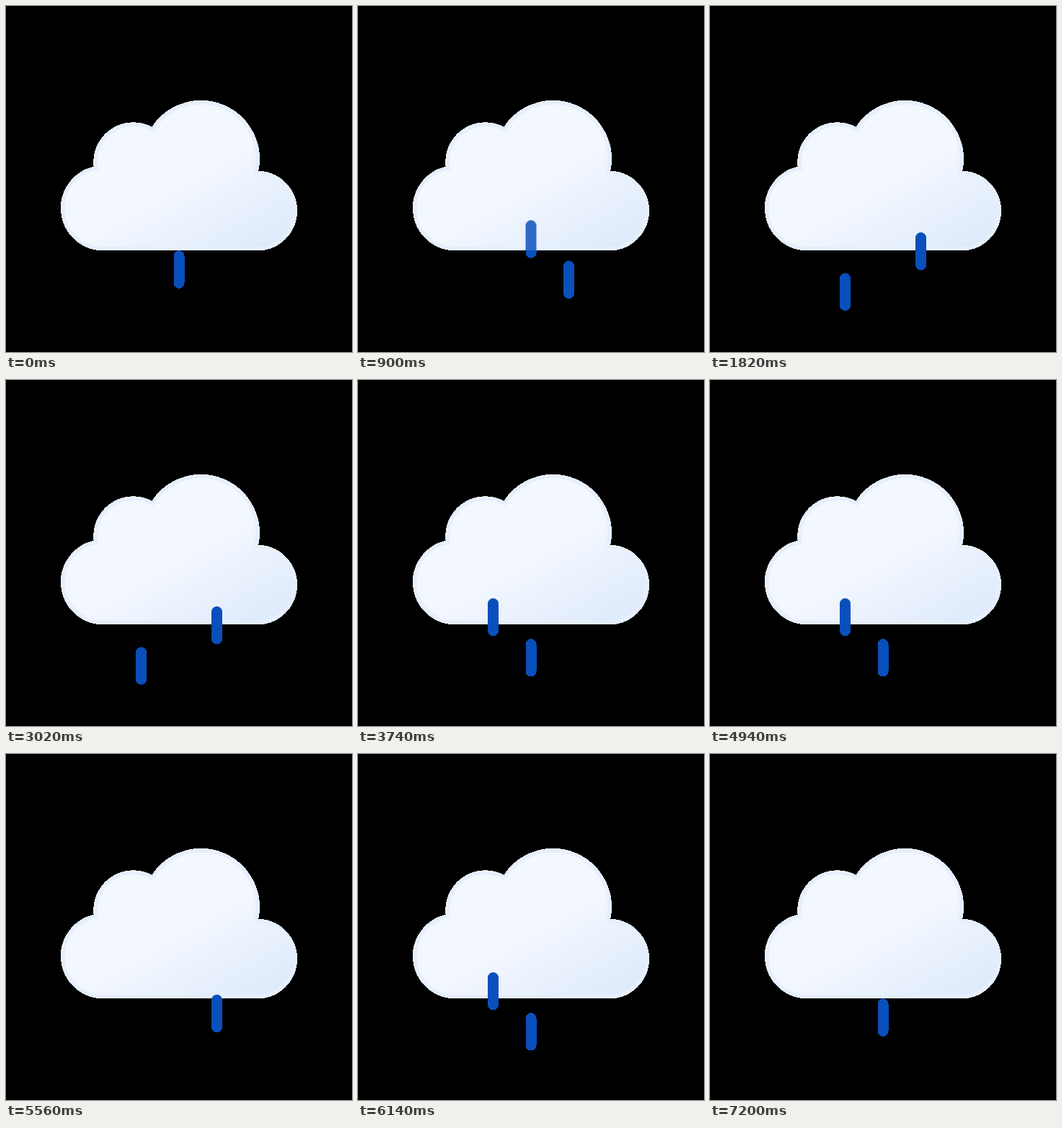
These frames come from a looping animation (480 by 480 pixels, 7.22 s). An HTML page:

```html
<!DOCTYPE html>
<html lang="en">
<head>
<meta charset="utf-8">
<title>Rain cloud</title>
<style>
  html, body { margin: 0; width: 100%; height: 100%; overflow: hidden; background: #000; }
  svg { display: block; width: 100%; height: 100%; }
  .drop { stroke: #0950bc; stroke-width: 16; stroke-linecap: round; }
  .crisp { shape-rendering: crispEdges; }
</style>
</head>
<body>
<svg viewBox="0 0 512 512">
  <defs>
    <linearGradient id="sheen" gradientUnits="userSpaceOnUse" x1="180.5" y1="175.7" x2="313.6" y2="406.4">
      <stop offset="0" stop-color="#f3f7fe"/>
      <stop offset=".45" stop-color="#f3f7fe"/>
      <stop offset="1" stop-color="#deeafb"/>
    </linearGradient>
    <path id="cloud" d="M372 252c-.7 0-1.4.1-2.1.1a83.9 83.9 0 0 0-153-64.2 56 56 0 0 0-84.6 48.1 56.6 56.6 0 0 0 .8 9 60 60 0 0 0 9.9 119H372a56 56 0 0 0 0-112Z"/>
    <mask id="inside" maskUnits="userSpaceOnUse" x="0" y="0" width="512" height="512">
      <use href="#cloud" class="crisp" y="-5" fill="#fff" stroke="#fff" stroke-width="6"/>
    </mask>
  </defs>
  <g id="below" class="crisp"></g>
  <use href="#cloud" class="crisp" y="-5" fill="url(#sheen)" stroke="#e6effc" stroke-width="6" stroke-miterlimit="10"/>
  <g mask="url(#inside)"><g id="above"></g></g>
</svg>
<script>
  const STEP = 20, STEPS = 361;           // ms per step, steps per loop
  const CYCLE = 60, FALL = 40, FADE = 6;  // in steps
  const REST_Y = 390, TRAVEL = 120;

  function addLine(id, x) {
    const line = document.createElementNS("http://www.w3.org/2000/svg", "line");
    const attrs = { class: "drop", x1: x, x2: x, y1: REST_Y - 20, y2: REST_Y + 20 };
    for (const name in attrs) line.setAttribute(name, attrs[name]);
    document.getElementById(id).append(line);
    return line;
  }

  function place(line, y, opacity) {
    line.setAttribute("transform", `translate(0 ${y})`);
    line.setAttribute("opacity", opacity);
  }

  const drops = [[200, 0], [312, 20], [256, 40]].map(([x, start]) => ({
    start, below: addLine("below", x), above: addLine("above", x)
  }));

  function draw(time) {
    const step = Math.floor(time / STEP) % STEPS;
    for (const { start, below, above } of drops) {
      const age = (step - start + CYCLE) % CYCLE;
      const y = TRAVEL * (age / FALL - 0.5);
      const alpha = Math.max(0, Math.min(1, age / FADE, (FALL - age) / FADE));
      // Off the cloud a drop vanishes hard, except in the first cycle.
      const faint = step < CYCLE ? alpha : 0;
      place(below, y, alpha > 0.5 ? 1 : faint);
      place(above, y, alpha);
    }
  }

  const begin = performance.now();
  function tick() {
    draw(performance.now() - begin);
    requestAnimationFrame(tick);
  }
  tick();
</script>
</body>
</html>
```
